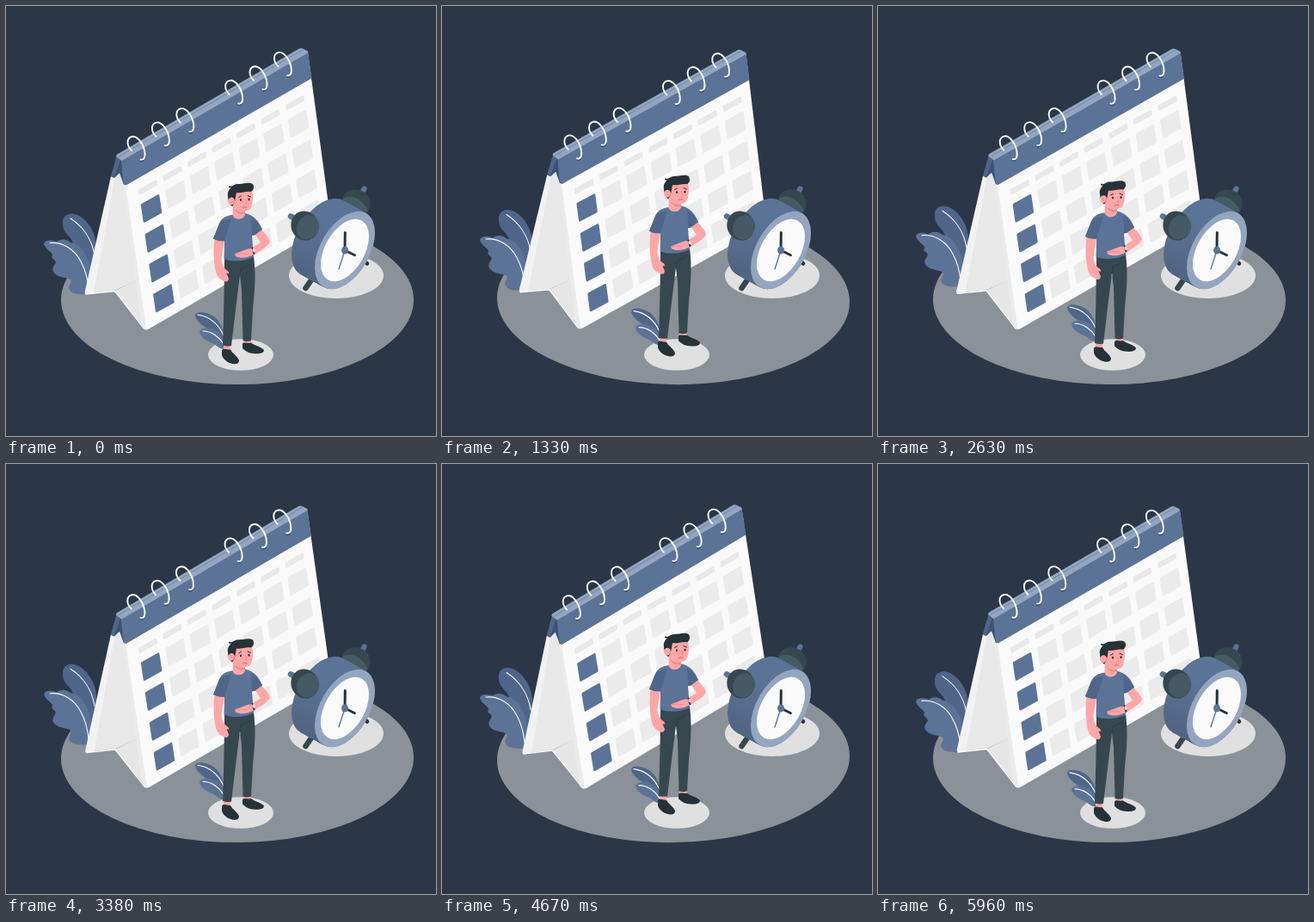
Write an HTML page with a canvas that moves like this. It is 500 px wide and 500 px high and loops after 6000 ms.

```html
<!DOCTYPE html>
<html lang="en">
<head>
<meta charset="utf-8">
<title>Calendar and clock</title>
<style>
html, body { margin: 0; width: 100%; height: 100%; overflow: hidden; background: #2b3747; }
canvas { display: block; width: 500px; height: 500px; }
</style>
</head>
<body>
<canvas id="stage"></canvas>
<script>
const LOOP = 6000;
const BLUE = '#5b7397', DEEP = '#4f668a', NIGHT = '#3e5275', PALE = '#94a5c0';
const SKIN = '#ffa6a6', BLUSH = '#ee8a8f', SLATE = '#37474f', STEEL = '#455a64', INK = '#263238';
const WHITE = '#fafafa', GREY = '#e0e0e0', CELL = '#ebebeb';

const canvas = document.getElementById('stage');
const ratio = window.devicePixelRatio || 1;
canvas.width = canvas.height = 500 * ratio;
const ctx = canvas.getContext('2d');

function fill(d, color) {
  ctx.fillStyle = color;
  ctx.fill(new Path2D(d));
}

function line(d, color, width) {
  ctx.strokeStyle = color;
  ctx.lineWidth = width;
  ctx.stroke(new Path2D(d));
}

function oval(x, y, rx, ry, color, turn = 0) {
  ctx.beginPath();
  ctx.ellipse(x, y, rx, ry, turn, 0, Math.PI * 2);
  ctx.fillStyle = color;
  ctx.fill();
}

// Circle of radius r on the isometric plane of the clock face
function disc(x, y, r, color) {
  oval(x, y, r * Math.SQRT1_2, r * Math.sqrt(1.5), color, Math.PI / 6);
}

// Slanted tile around (x, y) with edge vectors u and v and soft corners
function tile(x, y, u, v, color) {
  const at = (a, b) => [x + u[0] * a + v[0] * b, y + u[1] * a + v[1] * b];
  const soft = 1.5;
  ctx.beginPath();
  ctx.moveTo(...at(0, -0.5));
  ctx.arcTo(...at(0.5, -0.5), ...at(0.5, 0.5), soft);
  ctx.arcTo(...at(0.5, 0.5), ...at(-0.5, 0.5), soft);
  ctx.arcTo(...at(-0.5, 0.5), ...at(-0.5, -0.5), soft);
  ctx.arcTo(...at(-0.5, -0.5), ...at(0.5, -0.5), soft);
  ctx.closePath();
  ctx.fillStyle = color;
  ctx.fill();
}

function moved(dx, dy, draw) {
  ctx.save();
  ctx.translate(dx, dy);
  draw();
  ctx.restore();
}

function turned(cx, cy, angle, draw) {
  ctx.save();
  ctx.translate(cx, cy);
  ctx.rotate(angle);
  ctx.translate(-cx, -cy);
  draw();
  ctx.restore();
}

function shadows() {
  oval(384, 313.5, 55, 26.5, GREY);
  oval(273, 405.5, 38, 18.3, GREY);
}

function bigPlant() {
  fill('M66 253C65 243 74 239 83 243C94 248 104 262 105 278C105 292 102 306 97 314L84 292C80 284 80 277 75 270C71 265 66 262 66 253Z', DEEP);
  line('M75 247C89 256 100 271 103 290', WHITE, 1.1);
  fill('M44 277C45 271 54 272 59 274C64 270 71 271 75 275C82 276 88 281 91 287C98 296 100 310 98 335C88 336 76 335 74 330C71 325 78 322 75 318C70 316 58 315 55 309C52 303 60 300 57 296C55 294 52 293 54 290C55 287 47 284 44 277Z', BLUE);
  line('M51 275.5C66 274 80 283 87 297C92 306 95 318 96 328', WHITE, 1.1);
}

function smallPlant() {
  fill('M220 359C222 354 232 356 238 359C248 364 254 374 254 392L249 384C244 377 237 377 231 373C226 370 220 364 220 359Z', DEEP);
  line('M223 359C237 361 247 370 253 383', WHITE, 1.2);
  fill('M225 378C229 372 240 374 246 378C252 382 255 390 255 399C249 399 246 396 242 393C237 391 225 386 225 378Z', BLUE);
  line('M229 378C239 378 248 385 253 393', WHITE, 1.2);
}

function ring(x, y) {
  moved(x, y, () => {
    oval(17.5, 28, 3, 2, NIGHT, -0.5);
    line('M5 17C-1 11 -1 3 5 1C11 -1 18 8 20 17C21.5 24 20 28.5 15.5 27.5', WHITE, 1.9);
  });
}

function calendar() {
  // Back flap, base and page edge
  fill('M125 197L95 334L126 331L152 319L160 370L140 205L132 194Z', '#e8e8e8');
  fill('M122 198L91.5 333Q92 336 95 335L102 334L127 198Z', '#f2f2f2');
  fill('M126 331.5L152 318.5L161 374Z', '#e6e6e6');
  line('M93 335L126.5 331.5L159 373', WHITE, 1.4);
  fill('M134 190L158 373Q160 377 164 376.5L141 207Z', '#ebebeb');

  // Front page and blue header
  fill('M135 181L351 54L378 253L166 375.5Q163.5 377 163 374Z', WHITE);
  fill('M129 173L122 198L126 200L132 194L137 208L140 207L136 180Z', NIGHT);
  fill('M129 173L122 198L125.5 200L133 179Z', DEEP);
  fill('M134 179L351 53L355.5 84L139.5 208.5Q137 208 136.5 205Z', BLUE);
  fill('M128 175Q128 173 130 172L341 49.5Q343 48.5 345 49.5L350 52Q352 53 351 54.5L134.5 180Z', PALE);
  line('M131.5 175L345 51', '#7a8fb0', 1.3);

  for (let c = 0; c < 7; c++) {
    const x = 28.5 * c, y = -16.4 * c;
    tile(165 + x, 211 + y, [21.5, -12.2], [1, 6.8], '#e8e8e8');
    for (let r = 0; r < 4; r++) {
      tile(169 + x + 4.8 * r, 235.5 + y + 34.8 * r, [21.5, -12], [3.2, 22], c ? CELL : BLUE);
    }
  }
  for (const i of [0, 1, 2, 4, 5, 6]) ring(141 + 28.4 * i, 151 - 16.3 * i);
}

function clock() {
  // Right bell and feet sit behind the body
  line('M413 219L416.5 212.5', BLUE, 6);
  oval(407, 229, 17, 15.5, SLATE, 0.4);
  fill('M391 225C399 218 413 222 421 238L414 244L392 236Z', STEEL);
  line('M416 296L420 299.5', INK, 4.5);
  line('M356 317L348.5 328', SLATE, 6.5);

  const shade = ctx.createLinearGradient(340, 305, 358, 245);
  shade.addColorStop(0, '#506683');
  shade.addColorStop(1, BLUE);
  for (let i = 0; i <= 28; i++) {
    disc(367 + 27 * i / 28, 269 + 15 * i / 28, 40.4, shade);
  }
  disc(394, 284, 40.4, PALE);
  disc(394, 284, 32.4, WHITE);

  line('M331 244.5L338 248', BLUE, 6.5);
  oval(347.5, 255.5, 16, 17.3, SLATE, -0.4);
  oval(351, 257.5, 12.5, 14.5, STEEL, 0.45);

  line('M394 284L394.3 263.5', INK, 3);
  line('M394 284L405.5 289.7', INK, 2.8);
  line('M394 284L387 306', DEEP, 1.2);
  oval(394, 284, 4, 4.5, BLUE);
}

function legs() {
  fill('M253 388L261 388L261 402L253 402Z', SKIN);
  fill('M276 384L285 384L285 396L276 396Z', SKIN);
  fill('M251 400C254 397 257 400 261 399.5C263 404 269 407 271 412C271 417 266 417 260 415C255 413 252 409 251 406Z', INK);
  fill('M275 392.5C278 390 281 393 285 391.5C289 395 297 396 300 400C300 404 294 405 287 404C282 404 277 400 275 398Z', INK);
  fill('M254 293L288 291C291 312 289 335 287 352L285 389Q280 391 275.5 389L274 330L272 313L268 345L262 395Q257 396.5 252 394.5C253 362 254 328 254 293Z', SLATE);
  line('M272 313L273 306L283 301', '#2c3b42', 0.9);
}

function torso() {
  // Hanging arm
  fill('M243 268L254 272L250.5 294C251 302 254 306 258 308L259.5 311L256.5 311L259 317Q258 322 254 320C249 318 245 315 244 309C241 296 241 280 243 268Z', SKIN);
  // Neck, shirt and sleeves
  fill('M262 243C250 245 248 252 246 258L241 270.5Q247 274 254 273L253.5 294Q269 300 288 292L286 267L290 266L298 260C294 250 288 243 278 241Z', BLUE);
  fill('M250 250C246 256 244 264 241 270.5Q247 274 254 273C256 264 260 256 262 247Z', DEEP);
  fill('M285 246C286 255 286 260 286 267L290 266L298 260C294 252 290 248 285 246Z', DEEP);
  fill('M264 230L278 234L278 243C275 250 265 249 263.5 243Z', SKIN);
  // Bent arm with watch
  fill('M290 266L297.5 260.5C302 265 306 270 307 274C305 279 297 284 288 289C281 293 273 294 267 291L266 288L272 286C277 284 281 282 285 282L296 275Z', SKIN);
  line('M267 288.5Q274 287 280 288.5', BLUSH, 0.9);
  line('M286.5 281.5L288.5 288', INK, 2);
  oval(288, 284, 1.6, 2.2, GREY, -0.3);
}

function head() {
  fill('M262 218C266 211 281 210 286 215C288 222 287 231 284 236C280 240 273 239 269 236L263 233Z', SKIN);
  fill('M264 235Q271 241 278 239L278 242Q269 243 264 235Z', BLUSH);
  fill('M258 221C257 216 260 213 262 211C259 212 258 210 260 209C263 211 264 208 268 207C276 207 282 204 287 207C289 211 288 214 285 216C279 215 273 218 268 217C267 221 267 225 265 230L263 233C260 231 258 226 258 221Z', INK);
  oval(262, 227, 3.9, 4.4, SKIN, 0.3);
  line('M260.5 225.5Q263 226 263 229', BLUSH, 0.8);
  oval(273, 225.5, 1.1, 1.4, INK);
  oval(282.5, 225, 1.1, 1.4, INK);
  line('M270.5 222.5L273.5 220.8', INK, 1);
  line('M281 220.5L284.5 222', INK, 1);
  line('M278.5 225L280 230L277.5 230', BLUSH, 0.9);
  line('M275 234.5Q277.5 233 280 234.3', '#c9606a', 0.9);
}

function man() {
  legs();
  torso();
  head();
}

// Straight rise to `height` and back over one period
function hover(t, period, height) {
  const p = (t % period) / period;
  return -height * (1 - Math.abs(1 - 2 * p));
}

// Linear swing: 0, +1, 0, -1, 0
function swing(t) {
  const p = t / LOOP;
  return p < 0.25 ? 4 * p : p < 0.75 ? 2 - 4 * p : 4 * p - 4;
}

function paint(t) {
  ctx.setTransform(ratio, 0, 0, ratio, 0, 0);
  ctx.lineCap = ctx.lineJoin = 'round';
  ctx.fillStyle = '#2b3747';
  ctx.fillRect(0, 0, 500, 500);
  const leafY = hover(t, LOOP, 10);
  const sway = swing(t) * Math.PI / 180;
  turned(269, 341.8, sway, () => oval(269, 341.8, 205, 98.3, '#8a9198'));
  shadows();
  moved(0, leafY, bigPlant);
  turned(234.5, 212.5, sway, calendar);
  clock();
  moved(0, leafY, smallPlant);
  moved(0, hover(t, LOOP / 2, 10), man);
}

const start = performance.now();
function tick() {
  paint((performance.now() - start) % LOOP);
  requestAnimationFrame(tick);
}
tick();
</script>
</body>
</html>
```
